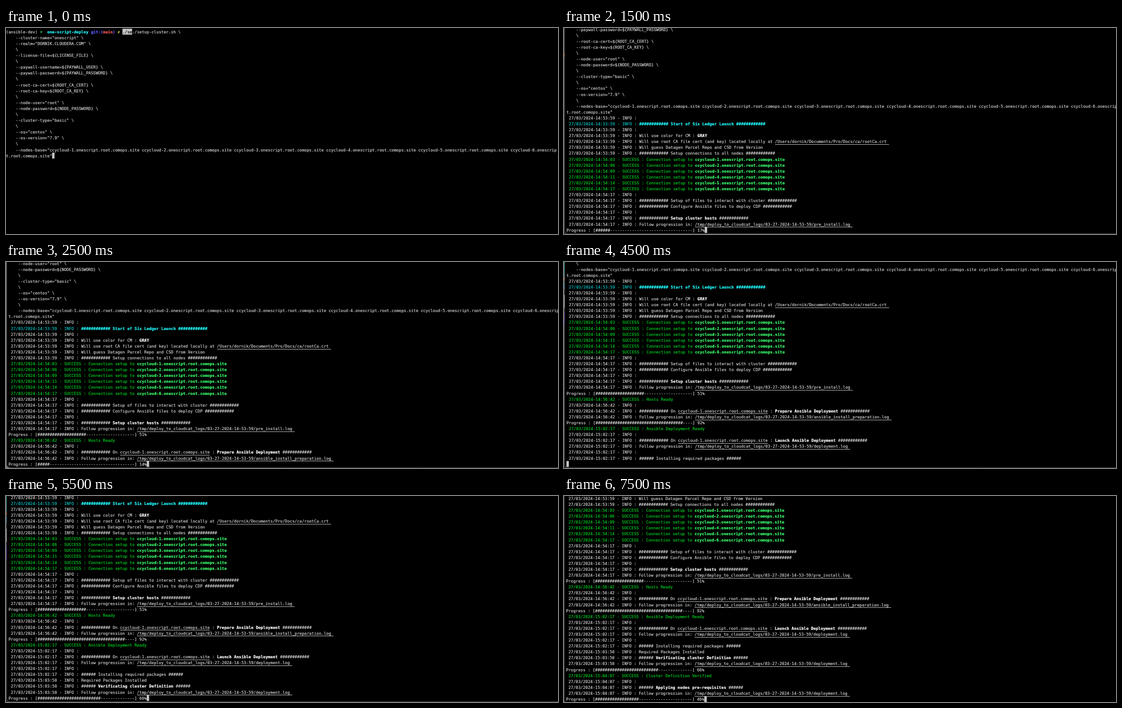
Write an HTML page with a canvas that moves like this. It is 1225 by 457 pixels and loops after 8000 ms.

```html
<!DOCTYPE html>
<html lang="en">
<head>
<meta charset="utf-8">
<title>Cluster setup terminal</title>
<style>
  html, body { margin: 0; width: 100%; height: 100%; overflow: hidden; background: #000; }
  canvas { display: block; }
</style>
</head>
<body>
<canvas id="stage" width="1225" height="457"></canvas>
<script>
const ctx = document.getElementById('stage').getContext('2d');
const LOOP = 8000, CELL_W = 5.383, CELL_H = 13.09, BASELINE = 10.1, ROWS = 35;
const GREY = '#c7c7c7';

// Inline style codes: "^" plus one letter switches the style of what follows.
const STYLES = {
  n: { color: '#d0d0d0' },
  u: { color: '#d0d0d0', underline: true },
  s: { color: '#000', back: GREY },
  w: { color: '#fff', bold: true },
  c: { color: '#00c5c7' },
  C: { color: '#20fcff', bold: true },
  g: { color: '#00cc22' },
  G: { color: '#3cff6e', bold: true },
  B: { color: '#5a5cff', bold: true },
  R: { color: '#ff5c57', bold: true },
  Y: { color: '#fffc67', bold: true }
};

const host = n => `ccycloud-${n}.onescript.root.comops.site`;
const hashes = n => '#'.repeat(n);
const line = (time, level, text = '') => ` 27/03/2024-${time} - ${level} : ${text}`;
const info = (time, text) => line(time, 'INFO', text);
const done = (time, text) => '^g' + line(time, 'SUCCESS', text);
const banner = (text, n = 12) => `${hashes(n)} ${text} ${hashes(n)}`;
const onHost = text => banner(`On ^u${host(1)}^n : ^w${text}^n`);
const follow = (time, file) =>
  info(time, `Follow progression in: ^u/tmp/deploy_to_cloudcat_logs/03-27-2024-14-53-59/${file}.log `);
const progress = percent => {
  const filled = Math.floor(percent * 0.4);
  return `Progress : [${hashes(filled)}${'-'.repeat(40 - filled)}] ${percent}%`;
};

const options = [
  '--cluster-name="onescript" \\', '--realm="DORNIK.CLOUDERA.COM" \\', '\\',
  '--license-file=${LICENSE_FILE} \\', '\\',
  '--paywall-username=${PAYWALL_USER} \\', '--paywall-password=${PAYWALL_PASSWORD} \\', '\\',
  '--root-ca-cert=${ROOT_CA_CERT} \\', '--root-ca-key=${ROOT_CA_KEY} \\', '\\',
  '--node-user="root" \\', '--node-password=${NODE_PASSWORD} \\', '\\',
  '--cluster-type="basic" \\', '\\',
  '--os="centos" \\', '--os-version="7.9" \\', '\\',
  `--nodes-base="${[1, 2, 3, 4, 5].map(host).join(' ')} ccycloud-6.onescrip`
];

const T1 = '14:53:59', T2 = '14:54:17', T3 = '14:56:42', T4 = '15:02:17', T5 = '15:03:58', T6 = '15:04:07';
const log = [
  '(ansible-dev) ^G➜  ^Cone-script-deploy ^Bgit:(^Rmain^B) ^Y✗ ^s./se^n./setup-cluster.sh \\',
  ...options.map(text => '    ' + text),
  't.root.comops.site"',
  info(T1),
  '^c' + info(T1, '^C' + banner('Start of Six Ledger Launch')),
  info(T1),
  info(T1, 'Will use color for CM : ^wGRAY'),
  info(T1, 'Will use root CA file cert (and key) located locally at ^u/Users/dornik/Documents/Pro/Docs/ca/rootCa.crt '),
  info(T1, 'Will guess Datagen Parcel Repo and CSD from Version'),
  info(T1, banner('Setup connections to all nodes')),
  ...['03', '06', '09', '11', '14', '17'].map((sec, i) =>
    done('14:54:' + sec, `Connection setup to ^G${host(i + 1)}`)),
  info(T2),
  info(T2, banner('Setup of files to interact with cluster')),
  info(T2, banner('Configure Ansible files to deploy CDP')),
  info(T2),
  info(T2, banner('^wSetup cluster hosts^n')),
  follow(T2, 'pre_install'),
  progress(51),
  done(T3, 'Hosts Ready'),
  info(T3),
  info(T3, onHost('Prepare Ansible Deployment')),
  follow(T3, 'ansible_install_preparation'),
  progress(92),
  done(T4, 'Ansible Deployment Ready'),
  info(T4),
  info(T4, onHost('Launch Ansible Deployment')),
  follow(T4, 'deployment'),
  info(T4),
  info(T4, banner('Installing required packages', 6)),
  info(T5, 'Required Packages Installed'),
  info(T5, banner('^wVerificating cluster Definition^n', 6)),
  follow(T5, 'deployment'),
  progress(66),
  done(T6, 'Cluster Definition Verified'),
  info(T6),
  info(T6, banner('^wApplying nodes pre-requisites^n', 6)),
  follow(T6, 'deployment')
];

// Slivers of the desktop left of the window: [top, bottom, colour].
const dark = [[0, 457, '#292929'], [56, 64, '#a8641c']];
const pale = [[0, 457, '#777']];
const mixed = [[0, 457, '#292929'], [0, 34, '#1b8aa0'], [34, 42, '#c98222'], [45, 60, '#1b8aa0'],
  [73, 102, '#bbb'], [110, 140, '#5a2aa8']];

// "last" is the bottom log row; "tail" replaces that row while it is in progress.
const scenes = [
  { at: 0, last: 21, x: 0, y: 1.6 },
  { at: 500, last: 41, tail: progress(8), edge: dark },
  { at: 1500, last: 41, tail: progress(17), edge: dark },
  { at: 2500, last: 46, tail: progress(14), edge: pale },
  { at: 3500, last: 46, tail: progress(52), edge: pale },
  { at: 4500, last: 53, tail: '', edge: mixed },
  { at: 5500, last: 56, tail: progress(66), edge: mixed },
  { at: 6500, last: 61, tail: progress(12), edge: mixed },
  { at: 7500, last: 61, tail: progress(46), edge: dark, x: 4.5, y: -1.2 }
];

function drawWindow(edge, x, y) {
  ctx.fillStyle = '#000';
  ctx.fillRect(0, 0, 1225, 457);
  if (!edge) return;
  for (const [top, bottom, color] of edge) {
    ctx.fillStyle = color;
    ctx.fillRect(0, top, 8, bottom - top);
  }
  ctx.beginPath();
  ctx.roundRect(x - 3.9, y - 20, 1300, 479.5, 7);
  ctx.fillStyle = '#000';
  ctx.fill();
  ctx.strokeStyle = '#555';
  ctx.lineWidth = 1;
  ctx.stroke();
}

// Draws one styled row and returns the x where it ends.
function drawRow(text, x, top) {
  for (const part of ('n' + text).split('^')) {
    const style = STYLES[part[0]], run = part.slice(1), width = run.length * CELL_W;
    if (style.back) {
      ctx.fillStyle = style.back;
      ctx.fillRect(x, top, width, CELL_H);
    }
    ctx.fillStyle = ctx.strokeStyle = style.color;
    ctx.save();
    ctx.translate(x, top + BASELINE);
    ctx.scale(0.1, 0.1); // large font scaled down keeps fractional advances
    ctx.font = `${style.bold ? 'bold ' : ''}89.41px "DejaVu Sans Mono", monospace`;
    ctx.lineWidth = 2.5; // a hairline outline gives the heavier terminal weight
    ctx.lineJoin = 'round';
    ctx.fillText(run, 0, 0);
    ctx.strokeText(run, 0, 0);
    ctx.restore();
    if (style.underline) ctx.fillRect(x, Math.round(top + 12.8), width, 1);
    x += width;
  }
  return x;
}

function draw({ last, tail, edge, x = 5.4, y = -3.56 }) {
  drawWindow(edge, x, y);
  const first = Math.max(0, last - ROWS + 1);
  let end, top;
  for (let i = first; i <= last; i++) {
    top = y + (i - first) * CELL_H;
    end = drawRow(i === last && tail !== undefined ? tail : log[i], x, top);
  }
  ctx.fillStyle = GREY;
  ctx.fillRect(end, top, CELL_W, CELL_H);
}

const start = performance.now();
function tick() {
  const time = (performance.now() - start) % LOOP;
  draw(scenes.findLast(scene => scene.at <= time));
  requestAnimationFrame(tick);
}
tick();
</script>
</body>
</html>
```
